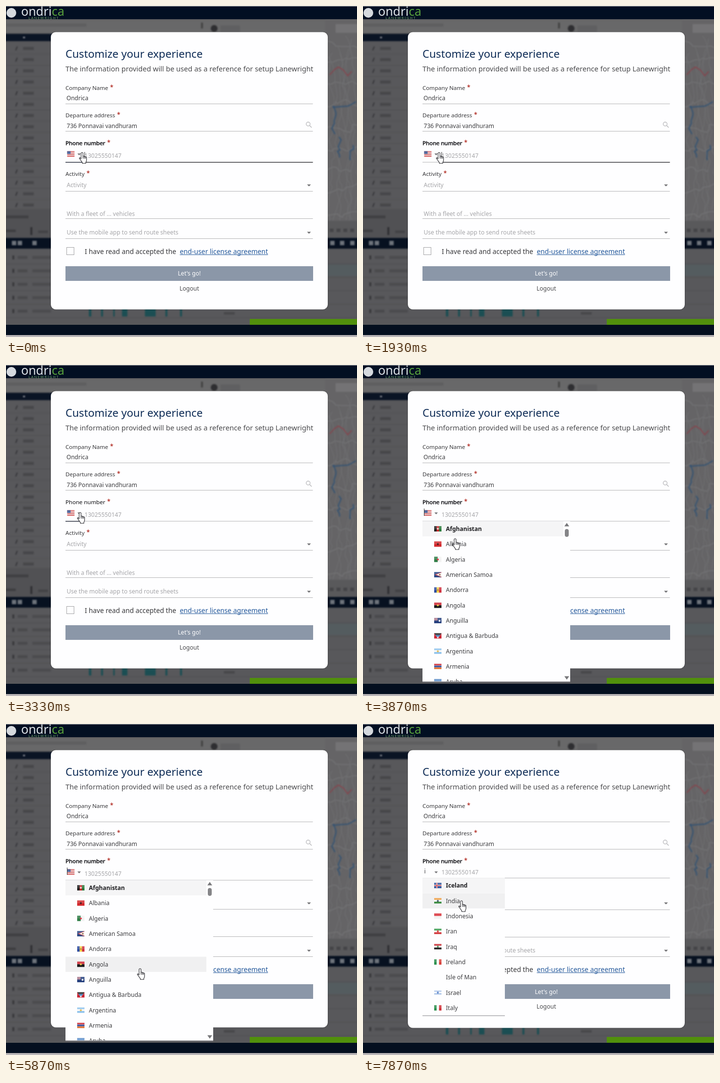
An HTML page with a canvas that plays this animation: 720x678 px, repeating every 8000 ms.

```html
<!DOCTYPE html>
<html lang="en">
<head>
<meta charset="utf-8">
<title>Customize your experience</title>
<style>
html, body { margin: 0; width: 100%; height: 100%; overflow: hidden; background: #58585b; }
canvas { display: block; }
</style>
</head>
<body>
<canvas id="stage" width="720" height="678"></canvas>
<script>
const LOOP = 8000;
const stage = document.getElementById('stage');
const backdrop = document.createElement('canvas');
backdrop.width = 720;
backdrop.height = 678;
let c = backdrop.getContext('2d');

function box(x, y, w, h, color) {
  c.fillStyle = color;
  c.fillRect(x, y, w, h);
}

function text(str, x, y, size = 12.05, color = '#3b3b3e', weight = 400) {
  c.font = `${weight} ${size}px "Noto Sans", sans-serif`;
  c.fillStyle = color;
  c.fillText(str, x, y);
  return c.measureText(str).width;
}

function shape(points, color) {
  c.beginPath();
  points.forEach(([x, y]) => c.lineTo(x, y));
  c.fillStyle = color;
  c.fill();
}

function polyline(points, color, width) {
  c.beginPath();
  points.forEach(([x, y]) => c.lineTo(x, y));
  c.strokeStyle = color;
  c.lineWidth = width;
  c.stroke();
}

function disc(x, y, r, color) {
  c.beginPath();
  c.arc(x, y, r, 0, 7);
  c.fillStyle = color;
  c.fill();
}

function rounded(x, y, w, h, r, color) {
  c.beginPath();
  c.roundRect(x, y, w, h, r);
  c.fillStyle = color;
  c.fill();
}

const triangle = (x, y, w, h, color) =>
  shape([[x - w / 2, y - h / 2], [x + w / 2, y - h / 2], [x, y + h / 2]], color);

let seed = 11;
const random = () => (seed = seed * 16807 % 2147483647) / 2147483647;

// A jagged line that wanders from (x, y) with a general heading
function wander(x, y, dx, dy, steps, color, width) {
  const points = [];
  for (let i = 0; i < steps; i++) {
    points.push([x, y]);
    x += dx + (random() - 0.5) * 14;
    y += dy + (random() - 0.5) * 14;
  }
  polyline(points, color, width);
}

// Blurred, dimmed application behind the dialog
function drawBackdrop() {
  box(0, 0, 720, 678, '#58585b');
  c.filter = 'blur(1.6px)';
  box(0, 28, 720, 28, '#686869');
  box(0, 36, 165, 6, '#5e5e60');
  box(400, 34, 4, 12, '#444');
  disc(427, 46, 7, '#2e2e31');
  box(440, 40, 40, 14, '#5f5f61');

  box(655, 28, 70, 447, '#656466');
  for (let i = 0; i < 9; i++) {
    wander(655 + random() * 65, 60 + random() * 60, 0, 14, 26, '#6e6e70', 1.5);
    wander(655, 70 + i * 45, 8, 0, 10, '#727274', 2);
  }
  box(676, 37, 50, 18, '#747375');
  polyline([[664, 141], [674, 130], [682, 125], [692, 131], [701, 143], [709, 134]], '#8f3a44', 1.6);
  wander(718, 196, -9, 2, 6, '#355371', 2.5);
  wander(672, 205, 0, 9, 7, '#355371', 2.5);
  wander(683, 268, 1, 9, 7, '#355371', 2.5);
  wander(712, 285, -1, 7, 6, '#355371', 2.5);

  box(-4, 57, 100, 15, '#0a1424');
  box(35, 63, 4, 3, '#8b8f96');
  for (let i = 0; i < 15; i++) {
    const y = 87 + i * 22.9;
    box(0, y + 11, 92, 1, '#505053');
    polyline([[20, y + 4], [23, y - 4]], '#303034', 2);
    box(35, y - 3, 22, 6, '#47474a');
  }
  box(-4, 416, 100, 59, '#515154');
  box(0, 429, 46, 6, '#404043');
  box(0, 458, 20, 5, '#3e3e41');
  box(50, 453, 4, 16, '#2f2f32');
  box(66, 460, 20, 5, '#434346');
  box(655, 440, 70, 35, '#59595b');
  for (let x = 664; x < 720; x += 14) box(x, 456, 8, 7, '#454548');

  box(-4, 475, 728, 22, '#071120');
  for (const x of [12, 24, 54, 665, 685, 706]) box(x, 481, 9, 9, '#6d737b');
  box(655, 529, 70, 24, '#545c5f');
  for (let i = 0; i < 5; i++) {
    const y = 515 + i * 27.5;
    box(-4, y + 13, 728, 1, '#4e4e51');
    box(13, y - 4, 4, 8, '#38383b');
    box(24, y - 3, 20, 6, '#4a4a4d');
    box(54, y - 3, 38, 6, '#4c4c4f');
  }
  for (const [x, w] of [[170, 5], [195, 4], [220, 3], [238, 11], [285, 22], [327, 4], [357, 4]])
    box(x, 618, w, 18, '#1b4e53');
  box(447, 627, 22, 5, '#47474a');
  c.filter = 'none';

  box(500, 641, 220, 12, '#51900c');
  box(0, 653, 720, 21, '#040f1f');
  box(0, 674, 720, 4, '#b9b5b7');
  box(0, 0, 720, 27, '#020f22');
  box(0, 0, 720, 1, '#9a9ea5');
  disc(11, 14, 10, '#d5d9de');
  const w = text('ondri', 31, 20, 25, '#dfe3e7', 500);
  text('ca', 31 + w, 20, 25, '#57a03c', 500);
  c.letterSpacing = '1.5px';
  text('LANEWRIGHT', 46, 27, 7.5, '#6f9f66', 500);
  c.letterSpacing = '0px';
}

// Flags: v = vertical bands, h = horizontal bands, then optional emblem
const flags = {
  us: { h: ['#c33', '#eee', '#c33', '#eee', '#c33', '#eee', '#c33'], canton: '#35508e' },
  Afghanistan: { v: ['#222', '#c22a2a', '#2c7a3c'], dot: '#ecc' },
  Albania: { h: ['#d32b2f'], dot: '#3a1114' },
  Algeria: { v: ['#2f7d47', '#f3f3f3'], dot: '#d34' },
  'American Samoa': { h: ['#2d4a86'], wedge: '#f2e8e8' },
  Andorra: { v: ['#2f4da0', '#f2d04a', '#cf3340'], dot: '#b9863c' },
  Angola: { h: ['#cc2330', '#1a1a1a'], dot: '#e6bd3e' },
  Anguilla: { h: ['#26407e'], canton: '#a9798d', badge: '#eee' },
  'Antigua & Barbuda': { h: ['#222', '#3a78b8', '#f2f2f2'], sides: '#cb2635' },
  Argentina: { h: ['#8fc3ec', '#f7f7f7', '#8fc3ec'], dot: '#e5bb52' },
  Armenia: { h: ['#cf2f38', '#35509f', '#e27a3c'] },
  Aruba: { h: ['#4d83c4', '#4d83c4', '#4d83c4', '#e8d35c', '#4d83c4'] },
  Iceland: { h: ['#2c549c'], cross: 1 },
  India: { h: ['#ee9a3c', '#f6f6f6', '#3a8d42'], dot: '#456' },
  Indonesia: { h: ['#d8303a', '#f3f3f3'] },
  Iran: { h: ['#399a4d', '#f5f5f5', '#d33a3f'], dot: '#d33' },
  Iraq: { h: ['#c92a33', '#f1f1f1', '#222'], dot: '#4a8a55' },
  Ireland: { v: ['#2f9150', '#f5f5f5', '#d8453f'] },
  Israel: { h: ['#f2f5fa', '#8fb0e0', '#f2f5fa', '#f2f5fa', '#8fb0e0', '#f2f5fa'], dot: '#5a83cc' },
  Italy: { v: ['#2f9150', '#f5f5f5', '#d2373f'] }
};

function drawFlag(name, x, y) {
  const f = flags[name], w = 15, h = 11;
  if (!f) return;
  (f.h || []).forEach((color, i, a) => box(x, y + i * h / a.length, w, h / a.length, color));
  (f.v || []).forEach((color, i, a) => box(x + i * w / a.length, y, w / a.length, h, color));
  if (f.canton) box(x, y, 7, 5.5, f.canton);
  if (f.badge) disc(x + 11, y + 6, 2, f.badge);
  if (f.wedge) {
    shape([[x + w, y], [x + 1, y + h / 2], [x + w, y + h]], '#c43b45');
    shape([[x + w, y + 1], [x + 4, y + h / 2], [x + w, y + h - 1]], f.wedge);
    disc(x + 11.5, y + h / 2, 1.6, '#8a6038');
  }
  if (f.sides) {
    shape([[x, y], [x + w / 2, y + h], [x, y + h]], f.sides);
    shape([[x + w, y], [x + w / 2, y + h], [x + w, y + h]], f.sides);
  }
  if (f.cross) for (const [s, color] of [[3, '#eee'], [1.4, '#d2333f']]) {
    box(x + 5.5 - s / 2, y, s, h, color);
    box(x, y + (h - s) / 2, w, s, color);
  }
  if (f.dot) disc(x + w / 2, y + h / 2, 2, f.dot);
  box(x, y, w, h / 2, 'rgba(255,255,255,.15)');
}

const allCountries = ['Afghanistan', 'Albania', 'Algeria', 'American Samoa', 'Andorra', 'Angola', 'Anguilla',
  'Antigua & Barbuda', 'Argentina', 'Armenia', 'Aruba'];
const iCountries = ['Iceland', 'India', 'Indonesia', 'Iran', 'Iraq', 'Ireland', 'Isle of Man', 'Israel', 'Italy'];

const BLUR = 3330, OPEN = 3730, TYPE = 6070, FILTER = 6130;
const ROW = 31.33, BLINK = 530;
const GRAY = '#b4b4b6', PALE = '#a5a5a8';

// Pointer stops: time, x, y of the fingertip
const stops = [[0, 156, 300], [600, 156, 300], [870, 291, 304], [1600, 291, 304], [1930, 156, 300],
  [2130, 143, 313], [2400, 139, 302], [2530, 152, 302], [2670, 152, 302], [2770, 150, 303], [2870, 152, 302],
  [3730, 152, 302], [4070, 251, 446], [4670, 251, 446], [4900, 290, 515], [5100, 285, 537], [5330, 275, 501],
  [7130, 275, 501], [7870, 202, 362], [LOOP, 202, 362]];

const clamp01 = v => Math.min(1, Math.max(0, v));

function pointerAt(t) {
  const i = stops.findIndex(s => s[0] > t);
  const [t0, x0, y0] = stops[i - 1], [t1, x1, y1] = stops[i];
  const k = (t - t0) / (t1 - t0), e = k * k * (3 - 2 * k);
  return [x0 + (x1 - x0) * e, y0 + (y1 - y0) * e];
}

const hand = new Path2D('M-2 13V2a2 2 0 0 1 4 0V8.5a1.3 1.3 0 0 1 2.6 0v.8a1.2 1.2 0 0 1 2.4 0v.8' +
  'a1.1 1.1 0 0 1 2.2 0V16q0 2-1.5 4v2.3H.5v-2q-2-2-4.2-6Q-6.5 12-5.2 11q1.4-.8 3.2 2z' +
  'M2 8.5v4M4.6 9.3v3.2M7 10.1v2.6');

function drawPointer(t, x, y) {
  if (x > 162 && t < 2000) {
    polyline([[x - 3, y - 7.5], [x + 3, y - 7.5]], '#222', 1);
    polyline([[x, y - 7.5], [x, y + 7.5]], '#222', 1);
    polyline([[x - 3, y + 7.5], [x + 3, y + 7.5]], '#222', 1);
    return;
  }
  c.save();
  c.translate(x, y);
  c.fillStyle = '#fff';
  c.fill(hand);
  c.strokeStyle = '#25252a';
  c.lineWidth = 1.1;
  c.lineJoin = 'round';
  c.stroke(hand);
  c.restore();
}

function label(str, y, color = '#38383b', strong = false) {
  const w = text(str, 122, y, 11.6, color);
  if (strong) {
    c.strokeStyle = color;
    c.lineWidth = 0.45;
    c.strokeText(str, 122, y);
  }
  text('*', 126 + w, y - 1, 12.05, '#b5372f', 600);
}

function drawForm(t) {
  const d = t >= FILTER ? 1 : 0;
  c.shadowColor = 'rgba(0,0,0,.2)';
  c.shadowBlur = 3;
  rounded(92, 53.5, 568, 568 + d, 10, '#fefeff');
  c.shadowColor = 'transparent';

  text('Customize your experience', 122, 106, 22.1, '#0d2b55');
  text('The information provided will be used as a reference for setup Lanewright', 122, 134, 14.65, '#4a4a4d');

  label('Company Name', 172);
  text('Ondrica', 124, 193);
  label('Departure address', 228);
  text('736 Ponnavai vandhuram', 124.5, 250);
  label('Activity', 348);
  text('Activity', 124.5, 371, 12.05, PALE);
  text('With a fleet of ... vehicles', 124.5, 430, 12.05, PALE);
  text('Use the mobile app to send route sheets', 124.5, 468, 12.05, PALE);
  for (const y of [200, 256, 379 + d, 435 + d, 476]) box(122, y, 507.5, 1, GRAY);
  triangle(621.5, 367.5, 8, 4, '#707073');
  triangle(621.5, 464.5, 8, 4, '#707073');

  c.beginPath();
  c.arc(619.8, 241.8, 4, 0, 7);
  c.strokeStyle = '#bcbcbf';
  c.lineWidth = 1.4;
  c.stroke();
  polyline([[622.8, 244.8], [627, 249]], '#bcbcbf', 1.6);

  c.lineWidth = 1;
  c.strokeStyle = '#a3a3a6';
  c.strokeRect(124.5, 494.5, 15, 15);
  text('I have read and accepted the', 161.5, 507.5, 13.8, '#38383b');
  const w = text('end-user license agreement', 356.5, 507.5, 13.8, '#265a9c');
  box(356.5, 509, w, 1, '#265a9c');
  box(122, 533, 508, 30, '#8b97a8');
  c.textAlign = 'center';
  text('Let\'s go!', 376, 552 + d / 2, 12.05, '#fff');
  text('Logout', 376, 583, 12.05, '#4a4a4d');
  c.textAlign = 'left';
}

function drawPhone(t) {
  const typed = t >= FILTER, open = t >= OPEN;
  const inputFocused = t < BLUR, focused = inputFocused || open;
  label('Phone number', 285, '#101014', focused);

  const y = typed ? 315 : 319.5;
  box(122, y, 507.5, 1, GRAY);
  if (inputFocused) box(160, y, 469.5, 1.5, '#48484c');
  c.globalAlpha = t < 1600 ? 1 - clamp01((t - 620) / 250) : open ? 0 : clamp01((t - 1960) / 200);
  box(122, y, 38, 1.5, '#3c4150');
  c.globalAlpha = 1;

  text('13025550147', 161, typed ? 308 : 310.5, 12.05, PALE);
  triangle(150, 304, 7, 4, '#77777a');
  if (t < TYPE) drawFlag('us', 125.5, 297.5);
  else text('i', 125.5, 306);

  // Blinking text caret: phone input, then country input, then after the typed letter
  const [from, x] = inputFocused ? [200 - BLINK, 161] : t < TYPE ? [OPEN, 125] : [TYPE, 129];
  if (focused && Math.floor((t - from) / BLINK) % 2 === 0) box(x, inputFocused ? 299 : 294, 1, 15, '#333');
}

function drawList(t, py) {
  const typed = t >= FILTER;
  const top = typed ? 315.3 : 320;
  const [w, h] = typed ? [169, 282.5] : [303, 329];
  const names = typed ? iCountries : allCountries;
  const rowWidth = typed ? w : 289;
  const k = clamp01((t - OPEN) / 130);

  c.save();
  c.globalAlpha = k;
  c.translate(0, top);
  c.scale(1, 0.8 + 0.2 * k);
  box(122, 0, w, h, '#fefeff');
  box(122, h - 1, w, 1.4, '#a4a4a8');
  c.beginPath();
  c.rect(122, 0, w, h - 1);
  c.clip();

  const hover = t > 4740 ? Math.floor((py - top) / ROW) : -1;
  names.forEach((name, i) => {
    const y = i * ROW;
    if (i === 0 || i === hover) box(122, y, rowWidth, ROW - 0.3, i === hover ? '#f0f0f1' : '#f5f5f6');
    drawFlag(name, 146, y + 10);
    text(name, 170, y + 20, 12.05, i ? '#3b3b3e' : '#1d1d20', i ? 400 : 700);
  });
  if (!typed) {
    triangle(418, 7, 10, -7, '#78787b');
    rounded(414, 16, 8, 16, 4, '#858588');
    triangle(418, 321, 10, 7, '#78787b');
  }
  c.restore();
}

function draw(t) {
  const [x, y] = pointerAt(t);
  c.drawImage(backdrop, 0, 0);
  drawForm(t);
  drawPhone(t);
  if (t >= OPEN) drawList(t, y);
  drawPointer(t, x, y);
}

drawBackdrop();
c = stage.getContext('2d');
const start = performance.now();
function frame() {
  draw((performance.now() - start) % LOOP);
  requestAnimationFrame(frame);
}
frame();
</script>
</body>
</html>
```
